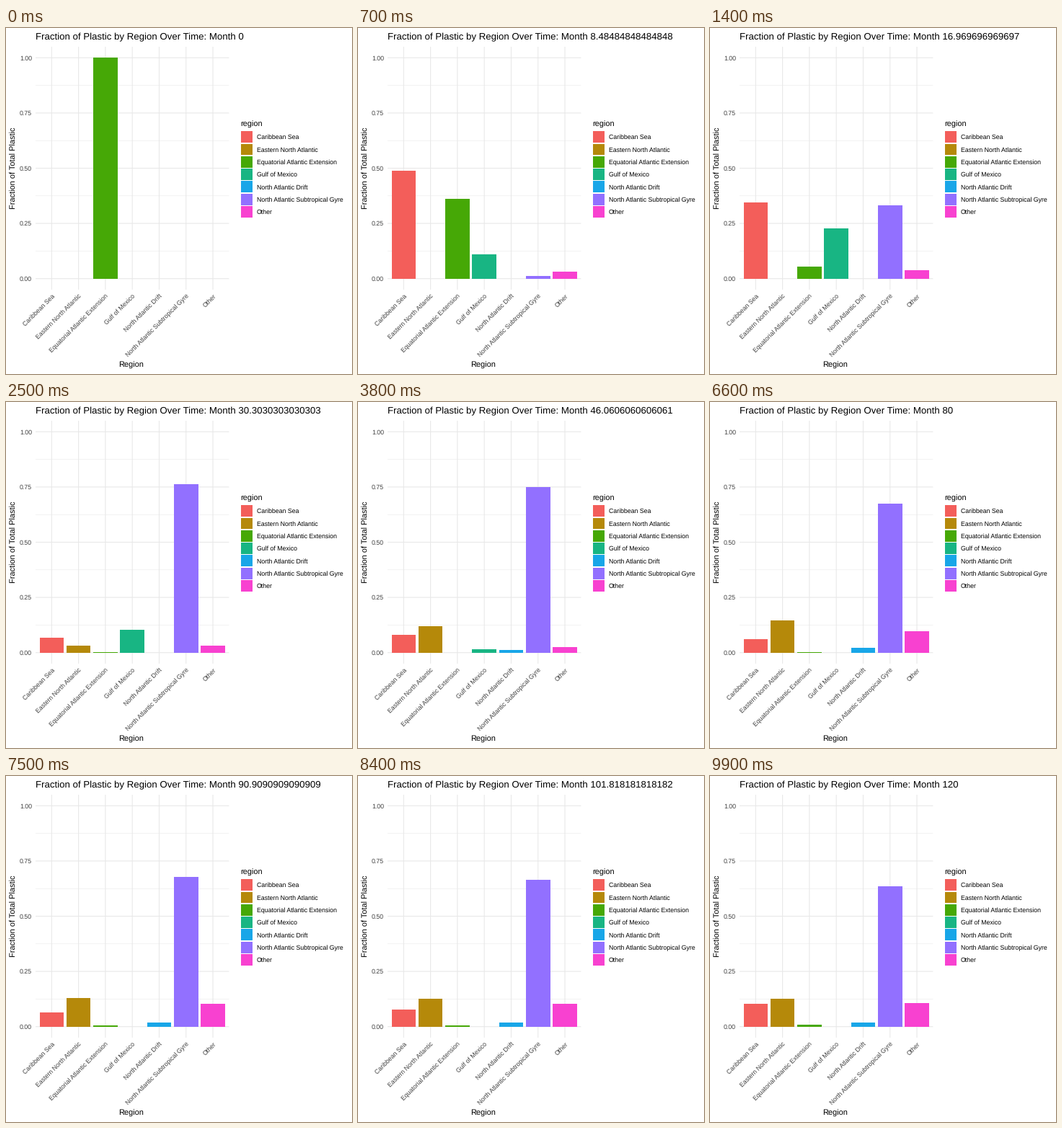
Animation of 480x480 px, one loop 10000 ms. Source, as a matplotlib script:

```python
import matplotlib.pyplot as plt
import numpy as np
from matplotlib.animation import FuncAnimation
from matplotlib.patches import Rectangle

SIZE, DPI = 480, 100
FRAMES, INTERVAL = 100, 100
LEFT, RIGHT, TOP, BOTTOM = 41, 309.4, 26, 363
STEP = (RIGHT - LEFT) / 7.2
BAR = 0.9 * STEP
GRID, TICK = "#e8e8e8", "#404040"

REGIONS = {
    "Caribbean Sea": "#f35e5a",
    "Eastern North Atlantic": "#b5890a",
    "Equatorial Atlantic Extension": "#46a806",
    "Gulf of Mexico": "#18b583",
    "North Atlantic Drift": "#18a6e8",
    "North Atlantic Subtropical Gyre": "#9270ff",
    "Other": "#f841d0",
}


def pulse(t, peak, sharp):
    """Rise from zero to 1 at the peak, then fade out."""
    u = t / peak
    return (u * np.exp(1 - u)) ** sharp


def bump(t, center, width):
    return np.exp(-((t - center) / width) ** 2)


def smooth(t, start, end):
    u = np.clip((t - start) / (end - start), 0, 1)
    return u * u * (3 - 2 * u)


def shares(t):
    """Plastic drifts from the equator through the Caribbean into the gyre."""
    caribbean = (0.51 * pulse(t, 8.5, 2.7) + 0.073 * bump(t, 45, 14)
                 + 0.103 * (t / 99) ** 1.7) * (t > 0)
    eastern = 0.127 * smooth(t, 14, 48) + 0.051 * bump(t, 52, 14) * (t > 14)
    equator = np.exp(-(t / 6.9) ** 1.5) + 0.009 * (max(t - 38, 0) / 61) ** 1.5
    gulf = 0.228 * pulse(t, 14, 3.8)
    drift = 0.02 * smooth(t, 24, 50) + 0.008 * bump(t, 52, 10)
    other = 0.038 * pulse(t, 14, 1) + 0.108 * (1 - np.exp(-max(t - 37, 0) / 15))
    gyre = max(0, 1 - caribbean - eastern - equator - gulf - drift - other)
    return caribbean, eastern, equator, gulf, drift, gyre, other


plt.rcParams.update({"font.family": "Liberation Sans", "text.hinting": "none"})
fig = plt.figure(figsize=(SIZE / DPI, SIZE / DPI), dpi=DPI, facecolor="white")
ax = fig.add_axes([0, 0, 1, 1])
ax.set(xlim=(0, SIZE), ylim=(SIZE, 0))
ax.axis("off")


def px(n):
    return n * 72 / DPI


def y_at(share):
    return BOTTOM - (BOTTOM - TOP) * (share + 0.05) / 1.1


def x_at(i):
    return LEFT + STEP * (i + 0.6)


def label(x, y, text, size=8.8, color="black", **kw):
    return ax.text(x, y, text, fontsize=px(size), color=color,
                   va="baseline", rotation_mode="anchor", **kw)


def line(xs, ys, width):
    ax.plot(xs, ys, color=GRID, lw=px(width), solid_capstyle="butt",
            snap=False, zorder=1)


def rect(x, y, w, h, color):
    return ax.add_patch(Rectangle((x, y), w, h, fc=color, lw=0,
                                  snap=True, zorder=2))


for v in np.arange(0.125, 1, 0.25):
    line([LEFT, RIGHT], [y_at(v)] * 2, 0.53)
for v in np.arange(0, 1.01, 0.25):
    line([LEFT, RIGHT], [y_at(v)] * 2, 1.07)
    label(36, y_at(v) + 3.2, f"{v:.2f}", color=TICK, ha="right")

bars = []
for i, (name, color) in enumerate(REGIONS.items()):
    x = x_at(i)
    line([x, x], [TOP, BOTTOM], 1.07)
    label(x + 4.5, 372.3, name, color=TICK, ha="right", rotation=45)
    bars.append(rect(x - BAR / 2, y_at(0), BAR, 0, color))
    y = 151.2 + 17.28 * i
    rect(325.9, y - 7.93, 15.9, 15.86, color)
    label(348, y + 3.2, name)

label(325, 136.7, "region", 11)
label(174, 470.6, "Region", 11, ha="center")
label(14.2, (TOP + BOTTOM) / 2, "Fraction of Total Plastic", 11,
      ha="center", rotation=90)
title = label(LEFT, 16.3, "", 13.2)


def update(k):
    month = k * 120 / (FRAMES - 1)
    title.set_text(f"Fraction of Plastic by Region Over Time: Month {month:.15g}")
    for bar, share in zip(bars, shares(k)):
        top = y_at(share)
        bar.set_y(top)
        bar.set_height(y_at(0) - top)
    return [title, *bars]


anim = FuncAnimation(fig, update, frames=FRAMES, interval=INTERVAL,
                     repeat=True, repeat_delay=0)
plt.show()
```
